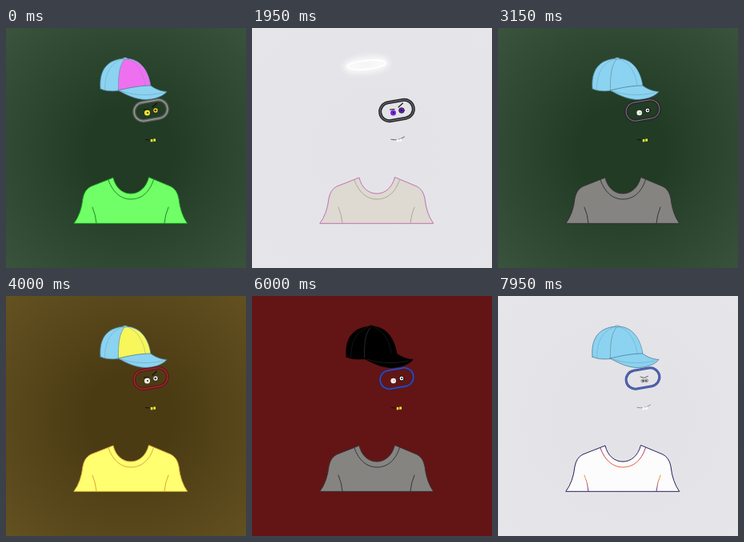
Animation of 300 by 300 pixels, one loop 8000 ms. Source, as an HTML page:

```html
<!DOCTYPE html>
<html lang="en">
<head>
<meta charset="utf-8">
<title>Invisible wardrobe</title>
<style>
  html, body { margin: 0; width: 100%; height: 100%; overflow: hidden; background: #213a23; }
  svg { display: block; width: 100vw; height: 100vh; }
  .scene { visibility: hidden; animation: show 8s step-end infinite; }
  .look { animation: look 1s ease-in-out infinite; }
  .settle { animation: settle 1s ease-out infinite; }
  .glance { animation: glance 1s ease-in-out infinite; }
  @keyframes show { 0% { visibility: visible; } 12.5%, 100% { visibility: hidden; } }
  @keyframes look {
    0%, 90%, 100% { transform: none; }
    30% { transform: translate(1px, -.5px); }
    60% { transform: translate(-1px, .5px); }
  }
  @keyframes settle { 0% { transform: translate(1.5px, 0); } 15%, 100% { transform: none; } }
  @keyframes glance {
    0%, 95%, 100% { transform: none; }
    35%, 65% { transform: translate(1.5px, -.5px); }
  }
</style>
</head>
<body>
<svg id="stage" viewBox="0 0 300 300" fill="none" stroke-linecap="round" stroke-linejoin="round">
  <defs>
    <filter id="glow" x="-50%" y="-150%" width="200%" height="400%"><feGaussianBlur stdDeviation="3.5"/></filter>
    <linearGradient id="rainbow" gradientUnits="userSpaceOnUse" x1="0" y1="187" x2="0" y2="244">
      <stop offset="0" stop-color="#7a2a90"/><stop offset=".35" stop-color="#ee4436"/>
      <stop offset=".7" stop-color="#f09a2c"/><stop offset="1" stop-color="#6a2aa0"/>
    </linearGradient>
  </defs>
</svg>
<script>
const path = (d, stroke, width = 1, fill = 'none') =>
  `<path d="${d}" stroke="${stroke}" stroke-width="${width}" fill="${fill}"/>`;
const dot = (x, y, r, fill, stroke = 'none', width = 1) =>
  `<circle cx="${x}" cy="${y}" r="${r}" fill="${fill}" stroke="${stroke}" stroke-width="${width}"/>`;

const backdrop = (inner, outer, id) => `
  <radialGradient id="${id}" gradientUnits="userSpaceOnUse" cx="155" cy="153" r="214">
    <stop offset=".25" stop-color="${inner}"/><stop offset="1" stop-color="${outer}"/>
  </radialGradient><rect width="300" height="300" fill="url(#${id})"/>`;

const shirt = (fill, edge, seam = edge) =>
  path('M85 244Q94 232 96 213Q98 202 106 198L134 187C137 200 146 207 156 207C166 207 175 200 178.5 186.5L206 198Q214 202 216 213Q218 232 226.5 244Z', edge, 1, fill) +
  path('M128 190C134 207 145 214 156 214C168 214 179 207 184.5 189.5M108 224Q112 233 113 244M203 224Q199 233 198 244', seam);

const cap = (fill, panel, line, seam) =>
  path('M118 76C116 53 126 39 149 38C168 38 178 53 181 73L141 78.5Q126 80 118 76Z', line, .8, fill) +
  path('M140.5 78C140 58 142 47 148 38.5C168 39 178 53 180.5 73Z', 'none', 0, panel) +
  path('M140.5 78C140 58 142 47 148 39', seam, .8) +
  path('M152 39C165 43 172 57 174.5 73M145 39C130 45 124 56 123.5 77', seam, .4) +
  path('M140 78C153 75 166 72 181 72C186 76 193 79 201 79.5C197 85 185 90 172 89.5C158 88 150 83 140 78Z', line, .8, fill) +
  path('M144 79C155 83 174 86 196 81', seam, .5) +
  `<ellipse cx="149" cy="38" rx="2.8" ry="1.1" fill="${fill}" stroke="${line}" stroke-width=".5"/>`;

const halo = () => ['stroke-width="9" opacity=".8" filter="url(#glow)"', 'stroke-width="1.8"'].map(style =>
  `<ellipse cx="143" cy="46" rx="24" ry="5.5" transform="rotate(-6 143 46)" stroke="#fff" ${style}/>`).join('');

const glasses = (color, shine, width = 4) => [[color, width], [shine, 1]].map(([stroke, w]) =>
  `<rect x="160" y="91.5" width="42" height="23" rx="11.5" transform="rotate(-10 181 103)" stroke="${stroke}" stroke-width="${w}"/>`).join('');

const eyes = {
  angry: color => dot(176.5, 106, 3.5, color) + dot(187, 103, 3.3, color, '#0b0b0b', .8) +
    dot(177, 106, .9, '#111') + dot(186.8, 103, 1.3, '#111') +
    path('M183 99L188.5 94M172.5 102L178 101.5', '#101010', 1.1),
  wide: color => dot(173, 105.5, 2.8, color, '#7b2a22') + dot(194, 102.3, 2.8, color, '#7b2a22'),
  close: () => dot(180, 106, 3.1, '#f4eee8') + dot(186.5, 105.2, 3.1, '#f4eee8') +
    dot(180.4, 106, 1.5, '#a8561c') + dot(186.1, 105.5, 1.5, '#a8561c'),
  plain: () => dot(176.7, 106, 3.3, '#f2f2f2') + dot(187, 103, 3, '#f2f2f2', '#111') +
    dot(177.4, 106, .8, '#888') + dot(187.2, 103, 1, '#111'),
  squint: () => dot(181, 106, 2.1, '#ccc', '#888', .8) + dot(185.5, 105.7, 2.1, '#ccc', '#888', .8) +
    dot(181.4, 106.2, 1.1, '#444') + dot(185.2, 106, 1.1, '#444') +
    path('M178 101L182.5 102.3L187.5 100.3', '#555', .9)
};

const teeth = color => path('M180.8 139H183.4V142.3H180.8ZM184.3 138.6H187V141.8H184.3Z', 'none', 0, color);
const grit = () => path('M174.5 139.5L179 140', '#111', 1) + teeth('#f2ec34');
const smile = (line, tooth) => path('M174 139.3Q183 141.3 190.5 136', line, .9) + teeth(tooth);

const sky = '#8bd3f1', ink = '#4e7e93', stitch = '#6a98ab';
const skyCap = (panel = sky) => cap(sky, panel, ink, stitch);
const blackCap = () => cap('#000', '#000', '#000', '#333');
const grayShirt = () => shirt('#868481', '#35343a');
const rainbowShirt = fill => shirt(fill, '#26205c', 'url(#rainbow)');
const green = ['#223b24', '#3a533c'], red = ['#621514', '#621514'];

// Each look: backdrop colours, eye motion, then shirt, hat, eyes, glasses and mouth.
const scenes = [
  { bg: green, motion: 'look', parts: [
    shirt('#70ff66', '#1f8a28'), skyCap('#ee70f0'),
    eyes.angry('#f3e333'), glasses('#5c615d', '#a5a9a5'), grit()] },
  { bg: ['#e4e4e8', '#e6e6ea'], motion: 'look', parts: [
    shirt('#ded9d1', '#c070b0', '#a9aa98'), halo(),
    eyes.angry('#7b22e4'), glasses('#28282b', '#77777b'), smile('#55555a', '#fff')] },
  { bg: ['#93806d', '#93806d'], motion: 'look', parts: [
    shirt('#ffff73', '#d9b640', '#e0a844'), blackCap(),
    eyes.wide('#f02416'), glasses('#52148a', '#8c49bd', 3.2), smile('#3a302a', '#f2ec34')] },
  { bg: green, motion: 'settle', parts: [
    grayShirt(), skyCap(),
    eyes.plain(), glasses('#28282b', '#77777b'), grit()] },
  { bg: ['#4b3b13', '#635121'], motion: 'look', parts: [
    shirt('#ffff70', '#d8a83a'), skyCap('#f7f65a'),
    eyes.angry('#f4f4f0'), glasses('#681719', '#a03336'), grit()] },
  { bg: red, motion: 'look', parts: [
    rainbowShirt('#fff'), skyCap(),
    eyes.close(), glasses('#8d1c1c', '#b82424', 1.2), grit()] },
  { bg: red, motion: 'look', parts: [
    grayShirt(), blackCap(),
    eyes.plain(), glasses('#252a78', '#4a55b5', 3), grit()] },
  { bg: ['#e3e2e7', '#e6e5ea'], motion: 'glance', parts: [
    rainbowShirt('#fcfcfc'), skyCap(),
    eyes.squint(), glasses('#3c4f9e', '#5a70b8', 3), smile('#8a8a8f', '#fff')] }
];

document.getElementById('stage').insertAdjacentHTML('beforeend', scenes.map(({ bg, motion, parts }, i) => {
  const [top, hat, gaze, frame, mouth] = parts;
  return `<g class="scene" style="animation-delay:${i ? i - 8 : 0}s">${backdrop(...bg, 'bg' + i)}
    ${top}${hat}<g class="${motion}">${gaze}</g>${frame}${mouth}</g>`;
}).join(''));
</script>
</body>
</html>
```
